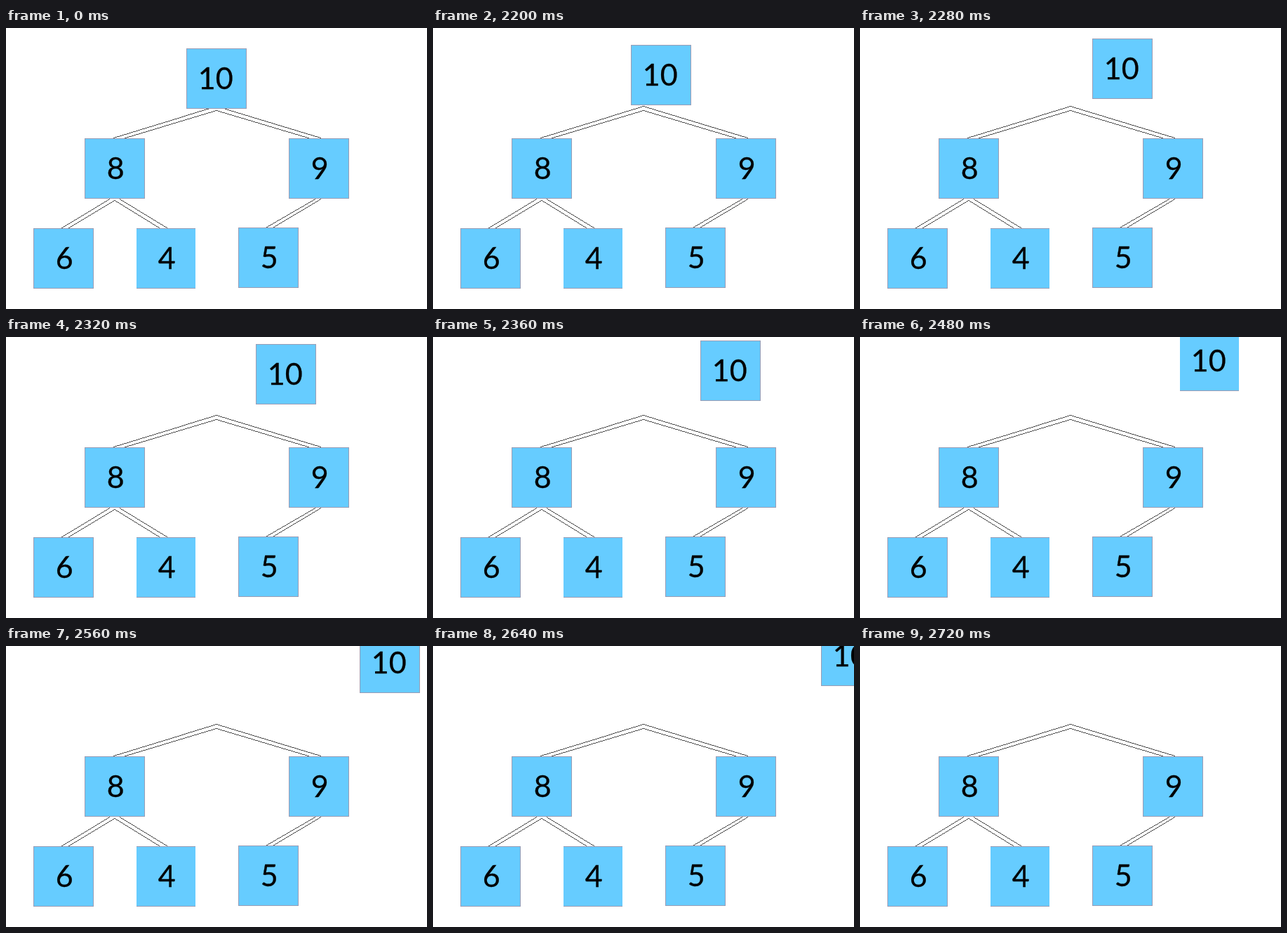
Write an HTML page that moves like this. It is 600x400 px and loops after 4.04 s.

```html
<!DOCTYPE html>
<html lang="en">
<head>
<meta charset="utf-8">
<title>Heap: remove the root</title>
<style>
html, body { margin: 0; width: 100%; height: 100%; overflow: hidden; background: #fff; }
svg { display: block; width: 600px; height: 400px; }
.edge { fill: none; stroke: #000; stroke-width: .7; shape-rendering: crispEdges; }
.face { fill: #6cf; shape-rendering: crispEdges; }
.rim { fill: none; stroke: #9a9cb4; stroke-width: 1; shape-rendering: crispEdges; }
.bare .side { display: none; }
text { font: 43px Lato, "Lucida Grande", sans-serif; text-anchor: middle; fill: #000; stroke: #000; stroke-width: .3; }
</style>
</head>
<body>
<svg id="stage" viewBox="0 0 600 400"></svg>
<script>
const LOOP = 4040, START = 2200, STEP = 40, STEPS = 14;
const stage = document.getElementById('stage');

function add(parent, tag, attrs, label) {
  const el = document.createElementNS('http://www.w3.org/2000/svg', tag);
  for (const key in attrs) el.setAttribute(key, attrs[key]);
  if (label) el.textContent = label;
  parent.appendChild(el);
  return el;
}

function place(node, x, y, bare) {
  node.setAttribute('transform', `translate(${x} ${y})`);
  node.setAttribute('class', bare ? 'bare' : '');
}

function box(label, x, y, bare) {
  const node = add(stage, 'g', {});
  add(node, 'rect', { class: 'face', x: 1, y: 1, width: 84, height: 84 });
  add(node, 'path', { class: 'rim', d: 'M1 .5H85M1 85.5H85' });
  add(node, 'path', { class: 'rim side', d: 'M.5 0V86M85.5 0V86' });
  add(node, 'text', { x: label.length > 1 ? 41.7 : 44.2, y: 57.5 }, label);
  place(node, x, y, bare);
  return node;
}

// Each branch is a pair of thin parallel lines.
[
  'M152.5 157V156.5L300 111.5L448.5 156.5V157',
  'M167 157.5L300 117.5L434 157.5',
  'M148 243.5L78 285.5M162 243.5L231 285.5',
  'M88 285.5L155 245.5L220 285.5',
  'M441 243.5L370 284.5M449 243.5L380 284.5'
].forEach(d => add(stage, 'path', { class: 'edge', d }));

box('8', 112, 157);
box('9', 403, 157);
box('6', 39, 285);
box('4', 185, 285, true);
box('5', 331, 284);
const root = box('10', 257, 29);

function draw(time) {
  const t = time % LOOP;
  const k = t < START ? 0 : Math.min(STEPS, Math.floor((t - START) / STEP) + 1);
  place(root, Math.round(257 + 24.7 * k), Math.round(29 - 4.8 * k), k === 8);
  root.style.display = k < STEPS ? '' : 'none';
}

const begin = performance.now();
function tick() {
  draw(performance.now() - begin);
  requestAnimationFrame(tick);
}
tick();
</script>
</body>
</html>
```
